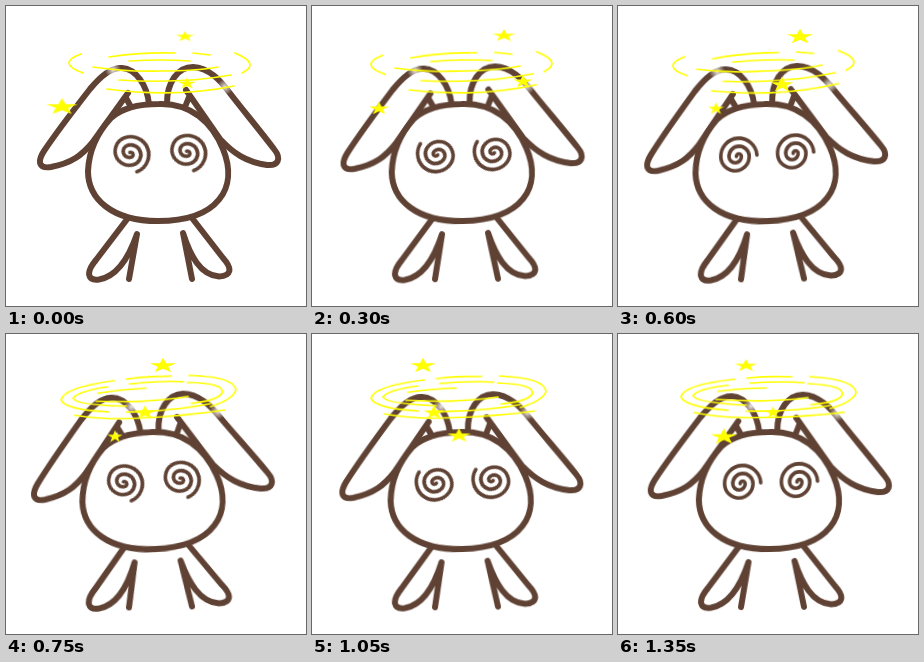
Recreate the animation shown at these times as an HTML page without scripts. Size 300 by 300 pixels, loop 1500 ms.

```html
<!DOCTYPE html>
<html lang="en">
<head>
<meta charset="utf-8">
<title>Dizzy bunny</title>
<style>
  html, body { margin: 0; width: 100%; height: 100%; overflow: hidden; background: #fff; }
  svg { display: block; width: 100%; height: 100%; }
  .ink { fill: none; stroke: #5f4234; stroke-width: 6; stroke-linecap: round; stroke-linejoin: round; }
  .ring { fill: none; stroke: #ff0; stroke-width: 1.7; stroke-linecap: round; }
  .eye { stroke-width: 3.6; animation: spin 750ms steps(5) infinite; }
  .head { transform-origin: 152px 300px; animation: sway 1500ms steps(5) infinite; }
  .legs { transform-origin: 152px 273px; animation: lean 1500ms steps(5) infinite; }
  .odd, .even { animation: blink 300ms step-end infinite; }
  .odd { animation-delay: -150ms; }
  .star { fill: #ff0; animation: 1500ms step-end infinite; }
  .low { animation-name: low; }
  .top { animation-name: top; }
  .mid { animation-name: mid; }

  @keyframes spin { from { transform: rotate(70deg); } to { transform: rotate(430deg); } }
  @keyframes sway { 50% { transform: rotate(-2.4deg); } 0%, 100% { transform: rotate(0deg); } }
  @keyframes lean { 50% { transform: skew(3deg, -1deg); } 0%, 100% { transform: skew(0deg, 0deg); } }
  @keyframes blink { 0% { opacity: 1; } 50%, 100% { opacity: 0; } }

  @keyframes low {
    0%, 100% { transform: translate(56px, 100px) scale(16.5, 8.8); }
    10% { transform: translate(58px, 101px) scale(13, 8); }
    20% { transform: translate(67px, 102px) scale(10.5, 7); }
    30% { transform: translate(88px, 102px) scale(9.5, 6.5); }
    40% { transform: translate(98px, 102px) scale(8.5, 6.5); }
    50% { transform: translate(109px, 102px) scale(8, 6.5); }
    60% { transform: translate(127px, 101px) scale(10.5, 7); }
    70% { transform: translate(147px, 101px) scale(12.5, 7.5); }
    80% { transform: translate(127px, 101px) scale(13, 8); }
    90% { transform: translate(106px, 102px) scale(14, 8.5); }
  }
  @keyframes top {
    0%, 100% { transform: translate(179px, 30px) scale(9.5, 5.5); }
    10% { transform: translate(186px, 30px) scale(10.5, 6); }
    20% { transform: translate(192px, 29px) scale(12, 6.5); }
    30% { transform: translate(207px, 29px) scale(14, 8); }
    40% { transform: translate(182px, 30px) scale(14, 8); }
    50% { transform: translate(157px, 31px) scale(14, 8); }
    60% { transform: translate(134px, 31px) scale(14, 8); }
    70% { transform: translate(111px, 31px) scale(13.5, 8); }
    80% { transform: translate(119px, 31px) scale(13, 7.5); }
    90% { transform: translate(128px, 31px) scale(12, 6.5); }
  }
  @keyframes mid {
    0%, 100% { transform: translate(181px, 77px) scale(9.5, 6); }
    10% { transform: translate(197px, 76px) scale(9.5, 6.5); }
    20% { transform: translate(211px, 75px) scale(10, 7); }
    30% { transform: translate(189px, 77px) scale(12.5, 8); }
    40% { transform: translate(164px, 78px) scale(12, 8); }
    50% { transform: translate(139px, 78px) scale(11.5, 7.5); }
    60% { transform: translate(112px, 78px) scale(12, 8); }
    70% { transform: translate(122px, 78px) scale(11, 7.5); }
    80% { transform: translate(138px, 78px) scale(10, 7); }
    90% { transform: translate(155px, 78px) scale(8.5, 6.5); }
  }
</style>
</head>
<body>
<svg viewBox="0 0 300 300">
  <defs>
    <radialGradient id="glow">
      <stop offset="0" stop-color="#fff" stop-opacity=".85"/>
      <stop offset="1" stop-color="#fff" stop-opacity="0"/>
    </radialGradient>
    <circle id="shine" r="8" fill="url(#glow)"/>
    <path id="star" d="M0-.9L.23-.21H.95L.37.22L.59.91L0 .48L-.59.91L-.37.22L-.95-.21H-.23Z"/>
    <path id="spiral" d="M20 0A18.1 18.1 0 0 0-16.2 0A14.2 14.2 0 0 0 12.2 0A10.1 10.1 0 0 0-8 0A6.2 6.2 0 0 0 4.4 0A2.5 2.5 0 0 0-.6 0"/>
  </defs>

  <g class="ink legs">
    <path d="M122 212L90 254C79 267 82 275 93 273.500C108 271 121 257 131 228L123 273"/>
    <path d="M186 212L217 252C227 263 225 270 213 270.500C194 269 184 249 177 227L186 273"/>
  </g>

  <g class="head">
    <g class="ink">
      <path d="M143 98C141 79 130 63 116 62C104 61 93 72 84 83C70 101 50 127 38 145C31 156 33 163 45 161C66 157 76 149 86 137L122 87M120 92L125 101"/>
      <path d="M161 97C161 76 172 61 187 61C203 62 214 74 223 86C236 103 252 122 268 143C276 153 272 160 261 159C240 156 227 147 214 133L180 84M183 91L179 101"/>
      <path fill="#fff" d="M153 98C185 97 206 116 217 143C233 182 212 215 152 215C106 215 82 193 82 165C83 143 93 125 105 112C116 102 133 98 153 98Z"/>
    </g>
    <g transform="translate(125.700 148.200)"><use href="#spiral" x="-1.7" y="1.2" class="ink eye"/></g>
    <g transform="translate(182.500 147)"><use href="#spiral" x="-1.7" y="1.2" class="ink eye"/></g>

    <g class="even">
      <use href="#shine" x="107" y="64"/>
      <use href="#shine" x="219" y="81"/>
      <path class="ring" d="M75 48Q50 57 77 67M103 51Q135 46 169 47M187 47L204 49M123 55Q155 53 184 55M229 47Q255 58 236 67M87 61Q120 66 154 65Q190 65 212 61M113 74Q175 78 225 69M101 83Q170 92 228 80"/>
    </g>
    <g class="odd">
      <use href="#shine" x="135" y="72"/>
      <use href="#shine" x="221" y="80"/>
      <path class="ring" d="M131 44Q152 42 176 43M119 45Q68 50 65 62Q68 72 112 76M112 51Q82 54 77 61Q80 68 130 71M134 49Q165 47 188 49M194 43Q240 46 240 60Q236 69 214 75M192 50Q230 52 226 62Q222 69 195 71M102 57Q125 54 150 54M100 65Q150 69 192 64M130 77Q180 78 214 72M78 78Q98 82 116 83Q170 85 228 79"/>
    </g>
  </g>

  <use href="#star" class="star low"/>
  <use href="#star" class="star top"/>
  <use href="#star" class="star mid"/>
</svg>
</body>
</html>
```
